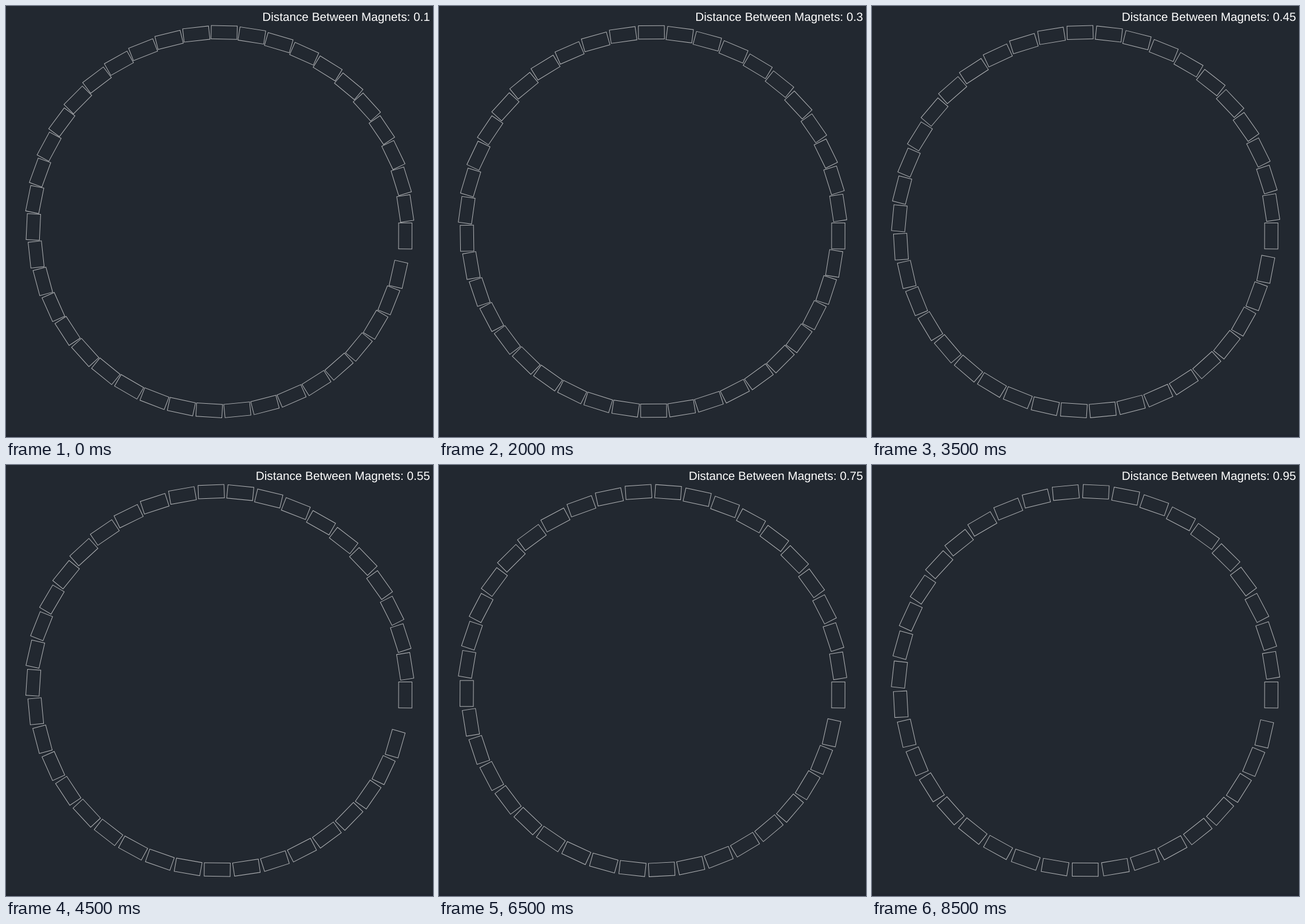
Write an HTML page with a canvas that moves like this. It is 745 px wide and 752 px high and loops after 9000 ms.

```html
<!DOCTYPE html>
<html lang="en">
<head>
<meta charset="utf-8">
<title>Distance Between Magnets</title>
<style>
  html, body { margin: 0; width: 100%; height: 100%; overflow: hidden; background: #222830; }
  canvas { display: block; }
</style>
</head>
<body>
<canvas id="stage" width="745" height="752"></canvas>
<script>
const ctx = document.getElementById('stage').getContext('2d');
const W = 745, H = 752;
const STEP_MS = 500, STEPS = 18;
const CX = 372.6, CY = 376, RX = 325, RY = 330;
const MAGNET_W = 23.3, MAGNET_H = 45.3;
const START = -4.45;      // ring angle of the first magnet, degrees
const HALF = 22;          // magnets on the evenly spaced part of the ring
const SNAP = 0.43;        // distance over which the stepped pitch repeats

const rad = deg => deg * Math.PI / 180;

// Degrees between neighbours: even at first, softly stepped on the rest
function pitches(distance) {
  const d = distance - 0.1;
  return {
    even: 8.46 + 0.79 * d,
    stepped: 8.44 + 0.78 * d + 0.08 * Math.cos(2 * Math.PI * d / SNAP)
  };
}

function drawMagnet(deg) {
  const a = rad(deg), c = Math.cos(a), s = Math.sin(a), s2 = Math.sin(2 * a);
  let r = 1 / Math.hypot(c / RX, s / RY);
  if (s > 0) r -= 1.4 * Math.abs(s2);
  ctx.save();
  ctx.translate(CX + r * c, CY - r * s);
  // Magnets face a point a little below the middle of the ring
  ctx.rotate(-rad(deg + 4.45 * c + 0.9 * s2));
  ctx.strokeRect(-MAGNET_W / 2, -MAGNET_H / 2, MAGNET_W, MAGNET_H);
  ctx.restore();
}

function drawRing(distance) {
  const { even, stepped } = pitches(distance);
  const limit = 360 + START - stepped;
  ctx.strokeStyle = 'rgba(255, 255, 255, 0.66)';
  ctx.lineWidth = 1;
  for (let k = 0, a = START; a <= limit; k++) {
    drawMagnet(a);
    a += k < HALF ? even : stepped;
  }
}

function drawLabel(distance) {
  ctx.fillStyle = '#fff';
  ctx.font = '20.73px "Liberation Sans", Arial, sans-serif';
  ctx.textRendering = 'geometricPrecision';
  ctx.textAlign = 'right';
  ctx.textBaseline = 'alphabetic';
  ctx.fillText('Distance Between Magnets: ' + distance, 739.8, 26);
}

function draw(ms) {
  const step = Math.floor(ms / STEP_MS) % STEPS;
  const distance = +(0.1 + 0.05 * step).toFixed(2);
  ctx.fillStyle = '#222830';
  ctx.fillRect(0, 0, W, H);
  ctx.fillStyle = '#20252f';
  ctx.fillRect(0, H - 4, W, 4);
  drawRing(distance);
  drawLabel(distance);
}

const begin = performance.now();
function tick() {
  draw(Math.max(0, performance.now() - begin));
  requestAnimationFrame(tick);
}
tick();
</script>
</body>
</html>
```
